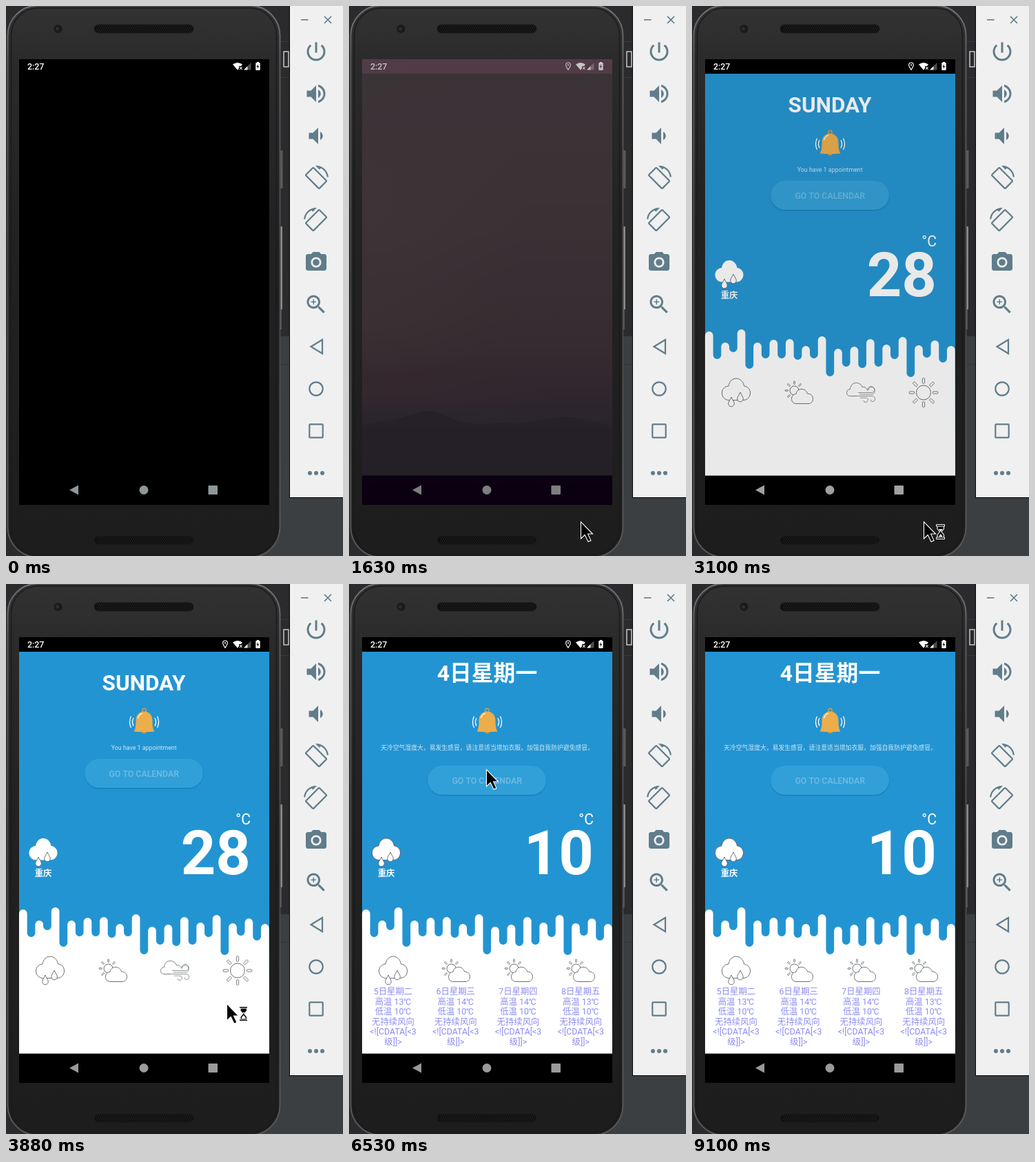
Recreate the animation shown at these times as an HTML page with a canvas. Size 489 px wide and 796 px high, loop 9.65 s.

```html
<!DOCTYPE html>
<html lang="en">
<head>
<meta charset="utf-8">
<title>Weather app in a phone emulator</title>
<style>
html, body { margin: 0; width: 100%; height: 100%; overflow: hidden; background: #2b2b2b; }
canvas { display: block; width: 489px; height: 796px; }
</style>
</head>
<body>
<canvas id="stage"></canvas>
<script>
const W = 489, H = 796, LOOP = 9650;
const canvas = document.getElementById('stage');
const g = canvas.getContext('2d');
const dpr = window.devicePixelRatio || 1;
canvas.width = W * dpr;
canvas.height = H * dpr;

const FONT = 'Roboto, "Noto Sans CJK SC", "Noto Sans CJK", sans-serif';
const BLUE = '#2394d2', SLATE = '#607d8b', LINE = '#5c6064', DARK = '#303030';
const NAV_TOP = 679.5;

function rect(x, y, w, h, color) {
  g.fillStyle = color;
  g.fillRect(x, y, w, h);
}
function round(x, y, w, h, r, fill, stroke, width = 1) {
  g.beginPath();
  g.roundRect(x, y, w, h, r);
  paint(null, fill, stroke, width);
}
function disc(x, y, r, fill, stroke, width = 1) {
  g.beginPath();
  g.arc(x, y, r, 0, 7);
  paint(null, fill, stroke, width);
}
function paint(path, fill, stroke, width = 1) {
  if (fill) { g.fillStyle = fill; path ? g.fill(path) : g.fill(); }
  if (stroke) {
    g.strokeStyle = stroke;
    g.lineWidth = width;
    path ? g.stroke(path) : g.stroke();
  }
}
function shape(d, x, y, fill, stroke, width = 1, scale = 1) {
  g.save();
  g.translate(x, y);
  g.scale(scale, Math.abs(scale));
  paint(new Path2D(d), fill, stroke, width);
  g.restore();
}
function text(s, x, y, size, color, weight = 400, align = 'center') {
  g.font = `${weight} ${size}px ${FONT}`;
  g.textAlign = align;
  g.fillStyle = color;
  g.fillText(s, x, y);
}
function gradient(x0, y0, x1, y1, ...stops) {
  const fill = g.createLinearGradient(x0, y0, x1, y1);
  for (const [at, color] of stops) fill.addColorStop(at, color);
  return fill;
}
// Soft elliptical patch of light; rgb is "r,g,b"
function glow(x, y, rx, ry, rgb, alpha) {
  const fill = g.createRadialGradient(0, 0, 0, 0, 0, 1);
  fill.addColorStop(0, `rgba(${rgb},${alpha})`);
  fill.addColorStop(1, `rgba(${rgb},0)`);
  g.save();
  g.translate(x, y);
  g.scale(rx, ry);
  rect(-1, -1, 2, 2, fill);
  g.restore();
}
// Number of evenly spaced steps already taken between two times
function stepsDone(t, from, to, count) {
  const k = Math.floor((t + 10 - from) / (to - from) * (count - 1)) + 1;
  return Math.max(0, Math.min(count, k));
}

// ---- Emulator window ----
function speaker(y) {
  round(128, y, 144, 12, 6, '#101010', '#1a1a1a');
  g.fillStyle = '#2a2a2a';
  for (let row = 0; row < 4; row++)
    for (let x = 132 + row % 2 * 1.5; x < 269; x += 3) g.fillRect(x, y + 1.5 + row * 2.6, 1.2, 1.2);
}

function phoneBody() {
  rect(0, 0, W, H, '#2b2b2e');
  rect(398, 51, 14, 1, '#3a3a3c');
  rect(398, 103, 14, 1, '#3a3a3c');
  rect(396, 478, 93, 318, '#3c3f41');
  rect(398, 518, 14, 1, '#313335');
  rect(340, 740, 149, 56, '#3c3f41');
  g.strokeStyle = '#c8c8c8';
  g.lineWidth = 1.5;
  g.strokeRect(403, 66, 7, 22);
  rect(398, 209, 3.5, 55, '#5a5a5a');
  rect(398, 319, 3, 120, '#8a8a8a');
  rect(398, 439, 1.5, 29, '#777');

  round(2.5, -.5, 395, 798, 43,
    gradient(0, 0, 0, H, [0, '#323232'], [.1, '#2b2b2b'], [.4, '#222222'], [1, '#1d1d1d']),
    gradient(0, 0, 0, H, [0, '#707478'], [.1, '#585858'], [.5, '#454545'], [1, '#585858']), 2);
  round(7.5, 3, 385, 791, 39, null, '#1a1a1a', 1.5);
  speaker(27);
  speaker(767);
  disc(75.5, 33, 6, '#1a1a1a');
  disc(74.5, 33, 2.5, '#2a2e30');
}

const ICONS = {
  power: 'M13 3h-2v10h2V3zm4.83 2.17l-1.42 1.42C17.99 7.86 19 9.81 19 12c0 3.87-3.13 7-7 7s-7-3.13-7-7c0-2.19 1.01-4.14 2.58-5.42L6.17 5.17C4.23 6.82 3 9.26 3 12c0 4.97 4.03 9 9 9s9-4.03 9-9c0-2.74-1.23-5.18-3.17-6.83z',
  louder: 'M3 9v6h4l5 5V4L7 9H3zm13.5 3c0-1.77-1.02-3.29-2.5-4.03v8.05c1.48-.73 2.5-2.25 2.5-4.02zM14 3.23v2.06c2.89.86 5 3.54 5 6.71s-2.11 5.85-5 6.71v2.06c4.01-.91 7-4.49 7-8.77s-2.99-7.86-7-8.77z',
  quieter: 'M18.5 12c0-1.77-1.02-3.29-2.5-4.03v8.05c1.48-.73 2.5-2.25 2.5-4.02zM5 9v6h4l5 5V4L9 9H5z',
  camera: 'M9 2L7.17 4H4c-1.1 0-2 .9-2 2v12c0 1.1.9 2 2 2h16c1.1 0 2-.9 2-2V6c0-1.1-.9-2-2-2h-3.17L15 2H9zm3 15c-2.76 0-5-2.24-5-5s2.24-5 5-5 5 2.24 5 5-2.24 5-5 5z',
  zoom: 'M15.5 14h-.79l-.28-.27C15.41 12.59 16 11.11 16 9.5 16 5.91 13.09 3 9.5 3S3 5.91 3 9.5 5.91 16 9.5 16c1.61 0 3.09-.59 4.23-1.57l.27.28v.79l5 4.99L20.49 19l-4.99-5zm-6 0C7.01 14 5 11.99 5 9.5S7.01 5 9.5 5 14 7.01 14 9.5 11.99 14 9.5 14zM12 10h-2v2H9v-2H7V9h2V7h1v2h2v1z'
};
const ROTATE = 'M16.48 2.52c3.27 1.55 5.61 4.72 5.97 8.48h1.5C23.44 4.84 18.29 0 12 0l-.66.03 3.81 3.81 1.33-1.32zm-6.25-.77c-.59-.59-1.54-.59-2.12 0L1.75 8.11c-.59.59-.59 1.54 0 2.12l12.02 12.02c.59.59 1.54.59 2.12 0l6.36-6.36c.59-.59.59-1.54 0-2.12L10.23 1.75zm4.6 19.44L2.81 9.17l6.36-6.36 12.02 12.02-6.36 6.36z';

function toolbar() {
  rect(411, 0, 78, 712, '#000');
  rect(412, 0, 77, 711, '#f0f0f0');
  rect(428, 19.2, 10.5, 1.6, SLATE);
  shape('M462 15l10 10M472 15l-10 10', 0, 0, null, SLATE, 1.7);
  const rows = { power: 66, louder: 127, quieter: 188, camera: 371, zoom: 432 };
  for (const name in rows) shape(ICONS[name], 432, rows[name] - 18, SLATE, null, 1, 1.5);
  disc(450, 371, 4.8, SLATE);
  shape(ROTATE, 432, 231, SLATE, null, 1, 1.5);
  shape(ROTATE, 468, 292, SLATE, null, 1, -1.5);
  shape('M442.500 493L459 483V503Z', 0, 0, null, SLATE, 2.2);
  disc(450, 554, 9.7, null, SLATE, 2.2);
  round(440.3, 605.3, 19.4, 19.4, 1, null, SLATE, 2.2);
  for (const x of [441, 450, 459]) disc(x, 676, 3, SLATE);
}

// ---- System bars ----
function statusBar(alpha, hole, pin) {
  g.save();
  g.globalAlpha = alpha;
  text('2:27', 31, 92, 12.4, '#fff', 500, 'left');
  shape('M329 84.500Q336 79.500 343 84.500L341 87H338V90.300L336 92.700Z', 0, 0, '#fff');
  shape('M339 88l3.600 4M342.600 88l-3.600 4', 0, 0, null, '#fff', 1.1);
  shape('M345 92.500L350.500 87V92.500Z', 0, 0, '#fff');
  round(362.3, 82, 6.4, 11, 1, '#fff');
  rect(364, 81, 3, 1.5, '#fff');
  shape('M366 84l-2.500 4h1.600l-.5 3 2.600-4h-1.700z', 0, 0, hole);
  if (pin) {
    shape('M318 92.300C315.800 89.200 314.700 87.200 314.700 85.300a3.300 3.300 0 0 1 6.600 0C321.300 87.200 320.200 89.200 318 92.300Z', 0, 0, null, '#fff', 1.2);
    disc(318, 85.3, 1.1, '#fff');
  }
  g.globalAlpha = alpha * .3;
  shape('M350.500 87L355.500 82V92.500H350.500Z', 0, 0, '#fff');
  g.restore();
}

function navKeys(color) {
  shape('M92 700.500L105 693.500V707.500Z', 0, 0, color);
  disc(200, 700.5, 6.5, color);
  round(293.5, 694, 13.5, 13, 1, color);
}

// ---- Home screen ----
function wallpaper() {
  rect(19, 77, 363, 645, gradient(0, 77, 0, 722,
    [0, '#f4b4d6'], [.15, '#f2abcb'], [.27, '#f2a3c0'], [.38, '#ea9abd'], [.48, '#d987b4'],
    [.58, '#d0769f'], [.65, '#bd5f8e'], [.71, '#a8437e'], [.76, '#84357d'], [.81, '#5b2b75'], [1, '#3b1c5c']));
  glow(30, 300, 230, 230, '255,186,205', .75);
  glow(19, 455, 220, 85, '242,160,190', .6);
  glow(60, 556, 240, 38, '200,78,132', .75);
  shape('M19 606C40 603 58 600 75 596C88 592 96 590 104 587C112 585 122 586 130 589C150 596 162 605 190 605C210 604 225 602 245 604C275 601 300 593 325 595C345 600 360 602 382 607V722H19Z',
    0, 0, gradient(0, 586, 0, 722, [0, '#37044f'], [.4, '#2b0047'], [1, '#1e002b']));
}

function homeScreen(t) {
  wallpaper();
  statusBar(.65, '#eeb0ce', false);
  navKeys('#b69fb9');
  const shown = (stepsDone(t, 1310, 1790, 7) - 1) / 6;
  if (shown <= 0) return;
  g.globalAlpha = shown;
  appFrame();
  rect(19, 98, 363, NAV_TOP - 98, DARK);
  statusBar(shown, '#000', true);
  navKeys('#a0a0a0');
  g.globalAlpha = 1;
}

// ---- Weather app ----
const CLOUD = 'M11 32C4.500 32 .5 27 .5 21.500C.5 16 4.500 12 10 11.500C11 5 15.500 .5 21 .5S31.500 5 32.500 11.500C37.500 12 41.500 16 41.500 21.500S37.500 32 31 32Z';
const DROP = 'M0 0C-1.500 4-4.300 6.500-4.300 9.500a4.300 4.300 0 0 0 8.600 0C4.300 6.500 1.500 4 0 0Z';
const SMALL_CLOUD = 'M17 32.500C12 32 10.500 28.500 10.500 25.500C10.500 21.500 13.500 18.500 17 18.500C17.500 14 21 11.500 25 11.500C29.500 11.500 32.500 14.500 33.500 18C38.500 18 41.500 21.500 41.500 25.500S38.500 32.500 35 32.500Z';

function rain(x, y, edge) {
  shape(CLOUD, x, y, '#fff', edge, .9);
  shape(DROP, x + 14, y + 27.5, '#fff', LINE, .9);
  shape(DROP, x + 27, y + 20.5, '#fff', LINE, .9);
}
function rays(x, y, near, len, width) {
  for (let i = 0; i < 8; i++) {
    g.save();
    g.translate(x, y);
    g.rotate(i * Math.PI / 4);
    round(near, -width / 2, len, width, .8, null, LINE, .8);
    g.restore();
  }
}
function partlySunny(x, y) {
  disc(x + 14.5, y + 13.5, 6.5, null, LINE, .9);
  rays(x + 14.5, y + 13.5, 9, 4.5, 1.8);
  shape(SMALL_CLOUD, x, y, '#fff', LINE, .9);
}
function wind(x, y) {
  shape('M15 19.500H6C2 19.500 .5 17 .5 14.500S2 10 5.500 9.500C6 3.500 9.500 .5 14 .5C19 .5 22 3 23 6.500C27 6 29.500 8 30.500 11', x, y, null, LINE, .8);
  shape('M17 14.500H36a4.500 4 0 1 0-4-4M19 17H38a5 6 0 1 0-7-5M15 19.500H37c6 0 6 8 1 8q-3 0-3-3M20 22H28c5 0 4 6.500 0 6.500q-3 0-3-2.500', x, y, null, LINE, .65);
}
function sun(x, y) {
  disc(x, y, 10.5, null, LINE, .9);
  rays(x, y, 13.5, 7.3, 3.2);
}

function bell() {
  disc(200.5, 183, 2.7, null, '#dd9a38', 1.4);
  disc(200.5, 213, 3.4, '#d9953a');
  shape('M185.500 213.500C188 209.500 188.500 205 188.500 198C188.500 189 194 184.500 200.500 184.500S212.500 189 212.500 198C212.500 205 213 209.500 215.500 213.500Q200.500 215 185.500 213.500Z', 0, 0, '#ecae4b');
  shape('M191.500 194Q193 188.500 198 187', 0, 0, null, '#fff', 1.3);
  shape('M185 194Q182 199.500 185 205.500M181.500 191.500Q177.500 199.500 181.500 208M216 194Q219 199.500 216 205.500M219.500 191.500Q223.500 199.500 219.500 208', 0, 0, null, '#fff', 1.3);
}

// Alternating crests and dips of the dripping edge, left to right
const DRIPS = [471, 511, 487, 501, 468, 525, 487, 510, 483, 510, 482, 512, 492, 510, 478, 536,
  496, 522, 493, 524, 482, 522, 490, 511, 479, 537, 491, 509, 484, 516, 492];

function drips() {
  const r = 5.85;
  g.beginPath();
  g.moveTo(19, NAV_TOP);
  DRIPS.forEach((y, i) => {
    const x = 24.8 + i * 2 * r, dip = i % 2 === 1;
    g.arc(x, dip ? y - r : y + r, r, Math.PI, 0, dip);
  });
  g.lineTo(382, NAV_TOP);
  g.fillStyle = '#fff';
  g.fill();
}

function button(y, t) {
  g.save();
  const press = stepsDone(t, 5750, 5990, 4) % 4;
  g.shadowColor = 'rgba(0,40,80,.3)';
  g.shadowBlur = press ? 5 : 2;
  g.shadowOffsetY = 1;
  round(114, y, 172, 42, 21, '#31a0d8');
  g.restore();
  if (press) {
    g.save();
    g.beginPath();
    g.roundRect(114, y, 172, 42, 21);
    g.clip();
    disc(200, 268, 35 * press, `rgba(255,255,255,${.2 - .04 * press})`);
    g.restore();
  }
  text('GO TO CALENDAR', 200.2, y + 26, 12.36, '#70bce4', 500);
}

const FORECAST = [['5日星期二', 13], ['6日星期三', 14], ['7日星期四', 14], ['8日星期五', 13]];

function forecast(x, [day, high]) {
  const lines = [day, `高温 ${high}℃`, '低温 10℃', '无持续风向', '<![CDATA[<3', '级]]>'];
  lines.forEach((s, i) => text(s, x, 594 + i * 14.5, 12.36, '#8c8cf3'));
}

function appFrame() {
  rect(19, 77, 363, 645, '#000');
}

function weather(t) {
  const loaded = t >= 6530;
  rect(19, 98, 363, NAV_TOP - 98, BLUE);
  drips();
  bell();
  const soft = 'rgba(255,255,255,.78)';
  if (loaded) {
    text('4日星期一', 200.5, 140, 31.8, '#fff', 700);
    text('天冷空气湿度大，易发生感冒，请注意适当增加衣服，加强自我防护避免感冒。', 200.5, 239.5, 8.83, soft);
  } else {
    text('SUNDAY', 200, 154, 31.5, '#fff', 700);
    text('You have 1 appointment', 200.2, 239.5, 8.83, soft);
  }
  button(loaded ? 263 : 253, t);
  text('°C', 355, 348, 21.2, '#fff', 400, 'right');
  text(loaded ? '10' : '28', 355, 420, 88.3, '#fff', 700, 'right');
  rain(33, 367.5, loaded ? LINE : null);
  text('重庆', 54, 422.5, 12.36, '#fff', 700);

  rain(43, 538.5, LINE);
  partlySunny(134, 543);
  if (loaded) {
    partlySunny(225, 543);
    partlySunny(315, 543);
    FORECAST.forEach((day, i) => forecast(64 + i * 90.75, day));
  } else {
    wind(224, 545);
    sun(336, 559.5);
  }
}

const REVEAL = [0, 0, .5, .9, .96, .99, 1];

function app(t) {
  appFrame();
  statusBar(1, '#000', t < 8160);
  const step = stepsDone(t, 2950, 3340, 6);
  const shown = REVEAL[step];
  if (shown) weather(t);
  if (shown < 1) {
    g.globalAlpha = 1 - shown;
    rect(19, 98, 363, NAV_TOP - 98, step ? '#2d2d2d' : DARK);
    g.globalAlpha = 1;
  }
  const gray = t < 3340 ? 160 + 2 * stepsDone(t, 1940, 2090, 3) - 2 * step : 154;
  navKeys(`rgb(${gray},${gray},${gray})`);
}

// ---- Mouse pointer: time, x, y, busy state (0 none, 1 and 2 hourglass) ----
const POINTER = [
  [310, 358, 772, 0], [390, 344, 752, 0], [460, 338, 747, 0], [1160, 336, 746, 0],
  [2550, 336, 746, 1], [3570, 330, 665, 1], [3650, 320, 607, 1], [3880, 320, 607, 2],
  [4050, 316, 596, 2], [4130, 311, 582, 2], [4200, 307, 571, 2],
  [4830, 297, 525, 0], [4910, 270, 430, 0], [4980, 236, 330, 0], [5060, 213, 270, 0],
  [5140, 204, 262, 0], [5210, 200, 260, 0], [5360, 200, 264, 0], [5440, 199, 268, 0],
  [6680, 199, 268, 1], [6990, 199, 268, 0], [7060, 199, 268, 1], [7230, 199, 268, 0],
  [8390, 199, 266, 0], [8560, 206, 285, 0], [8640, 225, 340, 0], [8715, 262, 430, 0],
  [8790, 300, 530, 0], [8870, 340, 640, 0], [8945, 370, 720, 0], [9020, 384, 772, 0]
];

function pointer(t) {
  const now = POINTER.findLast(p => p[0] <= t);
  if (!now || t >= 9100) return;
  const [, x, y, busy] = now;
  shape('M.5 .5V25L6.200 19.500L11 29.300L15 27.600L10.500 18H17.500Z', x, y, '#000', '#fff', 1.1);
  if (!busy) return;
  shape('M20 6.500V10.500L23.500 15L20 19.500V24H29.500V19.500L26 15L29.500 10.500V6.500Z', x, y, '#000', '#fff', 1.1);
  shape('M18.500 4.500H30.500V7H18.500ZM18.500 23H30.500V25.500H18.500Z', x, y, '#000', '#fff', 1);
  shape(busy === 1 ? 'M22 11H27.500L24.800 15ZM22 22L24.800 18L27.500 22Z' : 'M23 13H26.500L24.800 15ZM22 22V20L24.800 17L27.500 20V22Z', x, y, '#fff');
}

function screen(t) {
  if (t < 1310) {
    appFrame();
    statusBar(1, '#000', false);
    navKeys('#8f979b');
  } else if (t < 1790) {
    g.save();
    g.beginPath();
    g.rect(19, 77, 363, 645);
    g.clip();
    homeScreen(t);
    g.restore();
  } else {
    app(t);
  }
}

let start = null;
function draw(now) {
  if (start === null) start = now;
  const t = (now - start) % LOOP;
  g.setTransform(dpr, 0, 0, dpr, 0, 0);
  phoneBody();
  toolbar();
  screen(t);
  pointer(t);
  requestAnimationFrame(draw);
}
requestAnimationFrame(draw);
</script>
</body>
</html>
```
